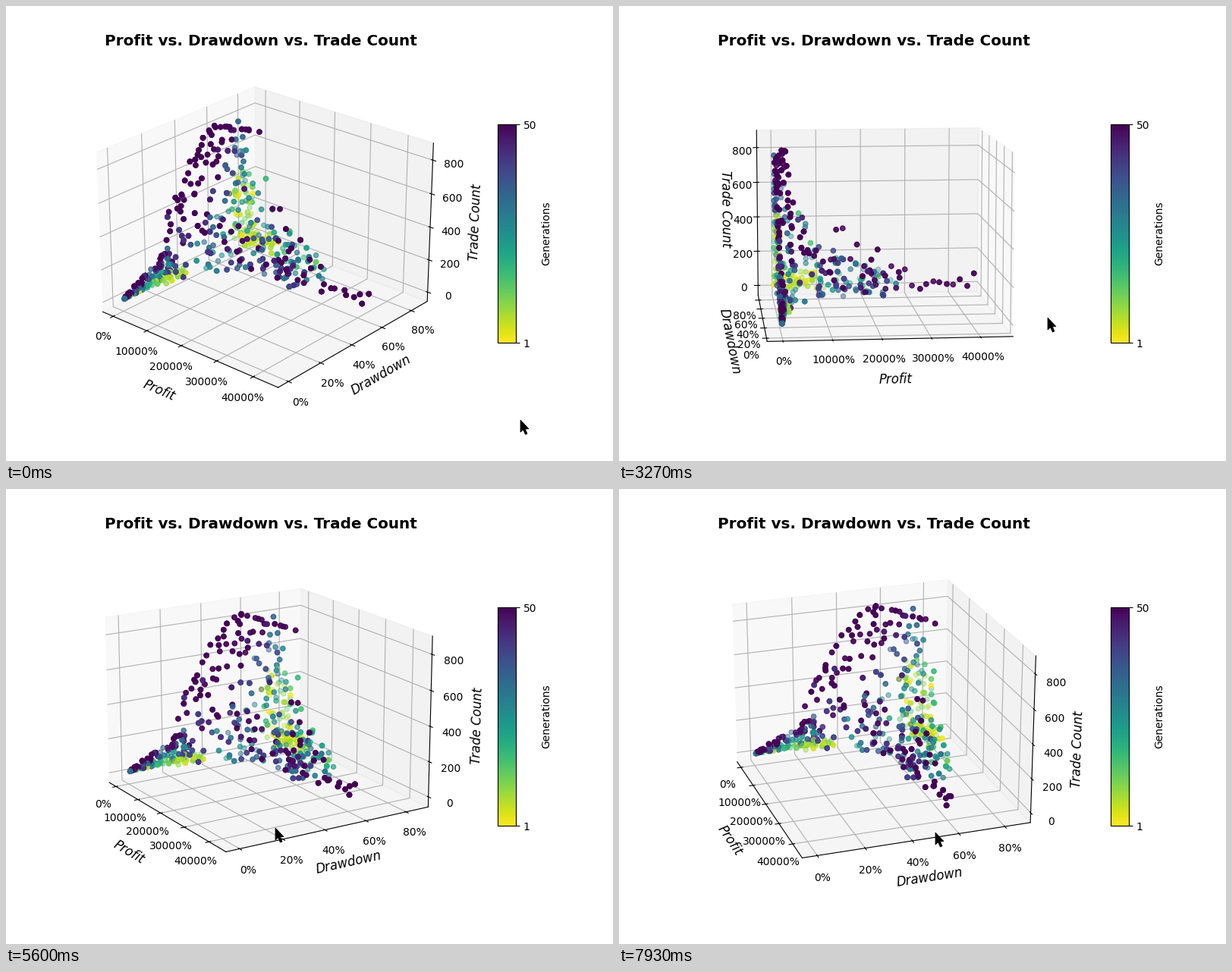
These frames come from a looping animation (800x600 px, 8000 ms). A matplotlib script:

```python
import numpy as np
import matplotlib.pyplot as plt
from matplotlib.animation import FuncAnimation
from matplotlib.patches import Polygon

W, H = 800, 600
FRAMES, INTERVAL = 125, 64  # 8000 ms loop
TICK = 1000 / 15            # motion is sampled 15 times a second
LAG = 5 * TICK              # the plot trails the dragging pointer
PRESS = 1470
AZIM, ELEV = -49, 25.2
TURN = 180 / 480            # degrees per dragged pixel

# pointer stops: time (ms), x, y
STOPS = np.array([
    (130, 678, 546), (600, 600, 414), (930, 560, 452), (1200, 450, 458),
    (PRESS, 445, 460), (2450, 569.5, 417), (2800, 569.5, 417),
    (3667, 556.5, 406.5), (4667, 477, 423), (6000, 321, 453),
    (6600, 306, 456), (7150, 306, 453), (7600, 365, 453.6), (7933, 417, 453)])
ARROW = np.array([(0, 0), (0, 16), (3.6, 12.8), (6.4, 19), (9, 18),
                  (6.4, 12), (11, 11.6)])

rng = np.random.default_rng(12)


def glide(t):
    """Pointer position on a monotone cubic through the stops."""
    times, pos = STOPS[:, 0], STOPS[:, 1:]
    t = np.clip(t, times[0], times[-1])
    gap = np.diff(times)[:, None]
    rate = np.diff(pos, axis=0) / gap
    a, b = rate[:-1], rate[1:]
    slope = np.zeros_like(pos)
    slope[1:-1] = 2 * np.maximum(a * b, 0) / (a + b + 1e-12)
    k = min(np.searchsorted(times, t, side="right") - 1, len(gap) - 1)
    h = gap[k, 0]
    s = (t - times[k]) / h
    rise = s * s * (3 - 2 * s)
    return (pos[k] + rise * (pos[k + 1] - pos[k])
            + h * s * (1 - s) * ((1 - s) * slope[k] - s * slope[k + 1]))


def main_body(n):
    """Below a falling profit / trades front, drawdown spread behind it."""
    p = 200 + 27000 * rng.random(n) ** 2.8
    z = 12 + (760 * np.exp(-p / 8000) + 90) * rng.random(n) ** 1.1
    low = np.maximum(z / 15.5, 52 * (1 - np.exp(-p / 6000)))
    low = np.maximum(low, 26)
    high = 82 - 0.02 * np.maximum(z - 400, 0) - p / 2500
    v = rng.random(n)
    score = 0.8 * (1 - v) + 0.75 * z / 840 + 0.5 * p / 43000
    score += rng.normal(0, 0.12, n)
    return p, low + np.maximum(high - low, 2) * v, z, 4 + 46 * score


def cautious(n):
    """A thin fan that starts near the origin."""
    d = 0.5 + 27 * rng.random(n)
    u = rng.random(n) ** 1.6
    g = 14 + 42 * u + 25 * np.exp(-d / 6) + rng.normal(0, 8, n)
    return 60 * d * rng.random(n), d, 15 + d * (0.8 + 7 * u), g


def block(n, p, d, z, g):
    """Uniform runs inside a box of (low, high) ranges."""
    return [rng.uniform(*span, n) for span in (p, d, z, g)]


def busy_front(n):
    """Low profit: trades climb to a peak at 55% drawdown, then ease off."""
    d = np.linspace(22, 82, n) + rng.normal(0, 1, n)
    fall = np.maximum(55 - d, 0) / 43
    z = 837 * (1 - fall ** 1.7) - 5.2 * np.maximum(d - 55, 0)
    return rng.uniform(500, 3000, n), d, z, np.full(n, 50)


def rich_front(n):
    """High profit: trades stay under a hyperbola."""
    p = np.linspace(12000, 43400, n)
    z = 48 + (6.2e6 / p - 48) * rng.random(n) ** 1.6
    return p, 58 + z / 50 + rng.normal(0, 1.2, n), z, np.full(n, 50)


def cloud():
    """Profit, drawdown, trades and generation of every run."""
    runs = np.hstack([
        main_body(240),
        cautious(100),
        block(45, (300, 9500), (70, 81), (20, 130), (1, 9)),
        block(30, (0, 1500), (66, 82), (15, 480), (1, 13)),
        block(28, (200, 2000), (18, 35), (12, 55), (4, 14)),
        busy_front(22),
        rich_front(22)])
    runs[3] = np.clip(runs[3], 1, 50)
    # runs recur over generations, so many stack up opaque
    copies = rng.integers(1, 4, runs.shape[1]) + 2 * (runs[3] > 38)
    return np.repeat(runs, copies, axis=1)


fig = plt.figure(figsize=(W / 100, H / 100), dpi=100, facecolor="white")
ax = fig.add_axes([0.12, 0.1, 0.6, 0.8], projection="3d")
profit, drawdown, trades, gen = cloud()
dots = ax.scatter(profit, drawdown, trades, c=gen, cmap="viridis_r",
                  vmin=1, vmax=50)

ax.set(xlim=(-3170, 46630), ylim=(-6.2, 91.3), zlim=(-58, 900),
       xticks=range(0, 40001, 10000), yticks=range(0, 81, 20),
       zticks=range(0, 801, 200))
for axis in (ax.xaxis, ax.yaxis):
    axis.set_major_formatter("{x:.0f}%")
label = dict(fontsize=12, style="italic")
ax.set_xlabel("Profit", labelpad=10, **label)
ax.set_ylabel("Drawdown", **label)
ax.set_zlabel("Trade Count", **label)
ax.set_title("Profit vs. Drawdown vs. Trade Count", fontsize="x-large",
             fontweight="bold")

bar = fig.colorbar(dots, cax=fig.add_axes([0.81, 0.26, 0.03, 0.48]),
                   ticks=[1, 50])
bar.set_label("Generations")

pointer = fig.add_artist(Polygon(ARROW, closed=True, facecolor="black",
                                 edgecolor="black", linewidth=0.5, zorder=20))


def update(i):
    t = np.ceil(i * INTERVAL / TICK) * TICK
    dx, dy = glide(max(t - LAG, PRESS)) - glide(PRESS)
    ax.view_init(elev=ELEV + TURN * dy, azim=AZIM - TURN * dx)
    x, y = (ARROW + np.round(glide(t))).T
    pointer.set_xy(np.column_stack([x / W, 1 - y / H]))
    return ()


anim = FuncAnimation(fig, update, frames=FRAMES, interval=INTERVAL,
                     repeat=True, repeat_delay=0,
                     init_func=lambda: update(0), blit=False)
plt.show()
```
